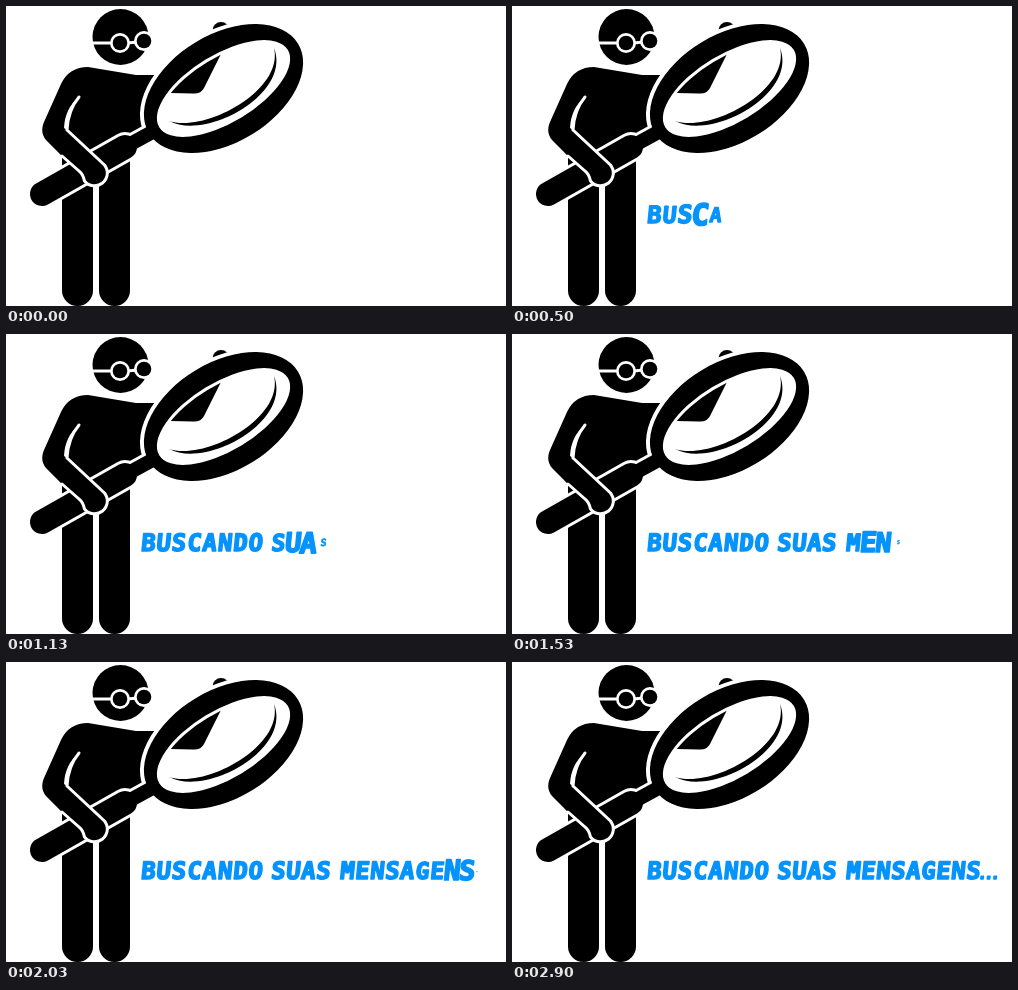
Write an HTML page with a canvas that moves like this. It is 500x300 px and loops after 5.01 s.

```html
<!DOCTYPE html>
<html lang="pt">
<head>
<meta charset="utf-8">
<title>Buscando</title>
<style>
  html, body { margin: 0; width: 100%; height: 100%; overflow: hidden; background: #fff; }
  canvas { display: block; width: 100vw; height: 100vh; }
</style>
</head>
<body>
<canvas id="stage" width="500" height="300"></canvas>
<script>
const ctx = document.getElementById("stage").getContext("2d");
const LOOP = 5010, FIRST = 100, STEP = 83, SETTLE = 500;
const BLACK = "#000", WHITE = "#fff", BLUE = "#0593fc";
const TILT = -31 * Math.PI / 180;
const SLANT = -0.1;

const body = new Path2D(
  "M38 116 L55 78 Q63 61 82 61 L130 69 L158 69 L150 124 L134 130 L134 141 " +
  "Q133 148 124 153 L124 284.5 A15.5 15.5 0 0 1 93 284.5 L93 176 L87 176 " +
  "L87 284.5 A15.5 15.5 0 0 1 56 284.5 L56 150 L42 136 Q33 128 38 116 Z");
const forearm = new Path2D(
  "M73 91 Q62 104 61 124 L98.5 159 A12.8 12.8 0 1 1 78.5 175 Q77 168 73 165 L56 150");
const forearmFill = new Path2D(forearm);
forearmFill.lineTo(40, 131);
forearmFill.lineTo(50, 103);
forearmFill.closePath();
const armCrease = new Path2D("M73 91 Q62 104 61 124 L58 122 Q59 102 73 91 Z");
const raisedArm = new Path2D("M140 86.5 L187 87.5 Q195 88 198 82 L215 48 L215 20 L140 40 Z");
const glint = new Path2D("M163 115 C200 135 286 88 268 42 C278 84 200 127 163 115 Z");

// Each word: text, centre of its first letter, distance between letters.
const words = [
  ["BUSCANDO", 142.5, 15.35],
  ["SUAS", 272.5, 15],
  ["MENSAGENS", 341.5, 15],
  ["...", 471, 6.5]
];
const letters = [];
let slot = 0;
for (const [text, x, pitch] of words) {
  [...text].forEach((char, i) =>
    letters.push({ char, x: x + i * pitch, start: FIRST + STEP * slot++ }));
  if (text.length < 9) slot++;
}

function disc(x, y, r, color) {
  ctx.fillStyle = color;
  ctx.beginPath();
  ctx.arc(x, y, r, 0, 2 * Math.PI);
  ctx.fill();
}

function line(x1, y1, x2, y2, width, color) {
  ctx.strokeStyle = color;
  ctx.lineWidth = width;
  ctx.beginPath();
  ctx.moveTo(x1, y1);
  ctx.lineTo(x2, y2);
  ctx.stroke();
}

function lensPath(a, b) {
  ctx.beginPath();
  ctx.ellipse(217.5, 82.5, a, b, TILT, 0, 2 * Math.PI);
}

function lens(a, b, color) {
  lensPath(a, b);
  ctx.fillStyle = color;
  ctx.fill();
}

function drawHead() {
  disc(114.5, 31, 28, BLACK);
  line(87, 37, 105, 37, 3, WHITE);
  line(122, 37, 131, 36, 3, WHITE);
  for (const [x, y] of [[114, 37], [138, 35]]) {
    disc(x, y, 10, WHITE);
    disc(x, y, 7.3, BLACK);
  }
}

function drawFigure() {
  ctx.lineCap = ctx.lineJoin = "round";
  drawHead();
  ctx.fillStyle = BLACK;
  ctx.fill(body);
  disc(215, 24.5, 8.5, BLACK);
  lens(91, 58, WHITE);

  line(36, 188, 119, 141, 30, WHITE);
  line(119, 141, 150, 124, 20, WHITE);
  line(36, 188, 119, 141, 24, BLACK);
  line(119, 141, 150, 124, 14, BLACK);

  ctx.fillStyle = BLACK;
  ctx.fill(forearmFill);
  ctx.strokeStyle = WHITE;
  ctx.lineWidth = 3;
  ctx.stroke(forearm);
  ctx.fillStyle = WHITE;
  ctx.fill(armCrease);

  lens(87, 54, BLACK);
  lens(75, 34, WHITE);
  ctx.save();
  lensPath(72, 31);
  ctx.clip();
  ctx.fillStyle = BLACK;
  ctx.fill(raisedArm);
  ctx.restore();
  ctx.fillStyle = BLACK;
  ctx.fill(glint);
}

// Springy growth: full size near 85 ms, largest near 170 ms.
function pop(age) {
  if (age >= SETTLE) return 1;
  return 1 - Math.exp(-age * 0.0095) * Math.cos(age * Math.PI / 170);
}

function drawText(time) {
  ctx.fillStyle = ctx.strokeStyle = BLUE;
  ctx.lineWidth = 1.5;
  ctx.textAlign = "center";
  ctx.textBaseline = "alphabetic";
  for (const { char, x, start } of letters) {
    if (time <= start) continue;
    const scale = pop(time - start);
    const size = char === "." ? 15 : 24;
    ctx.save();
    ctx.translate(x, 208);
    ctx.transform(scale, 0, SLANT * scale, scale, 0, 0);
    ctx.font = `bold ${size}px "DejaVu Sans Mono", monospace`;
    ctx.fillText(char, 0, 9);
    ctx.strokeText(char, 0, 9);
    ctx.restore();
  }
}

function render(time) {
  ctx.fillStyle = WHITE;
  ctx.fillRect(0, 0, 500, 300);
  drawFigure();
  drawText(time);
}

let origin;
function tick(now) {
  origin ??= now;
  render(Math.max(0, now - origin) % LOOP);
  requestAnimationFrame(tick);
}
render(0);
requestAnimationFrame(tick);
</script>
</body>
</html>
```
